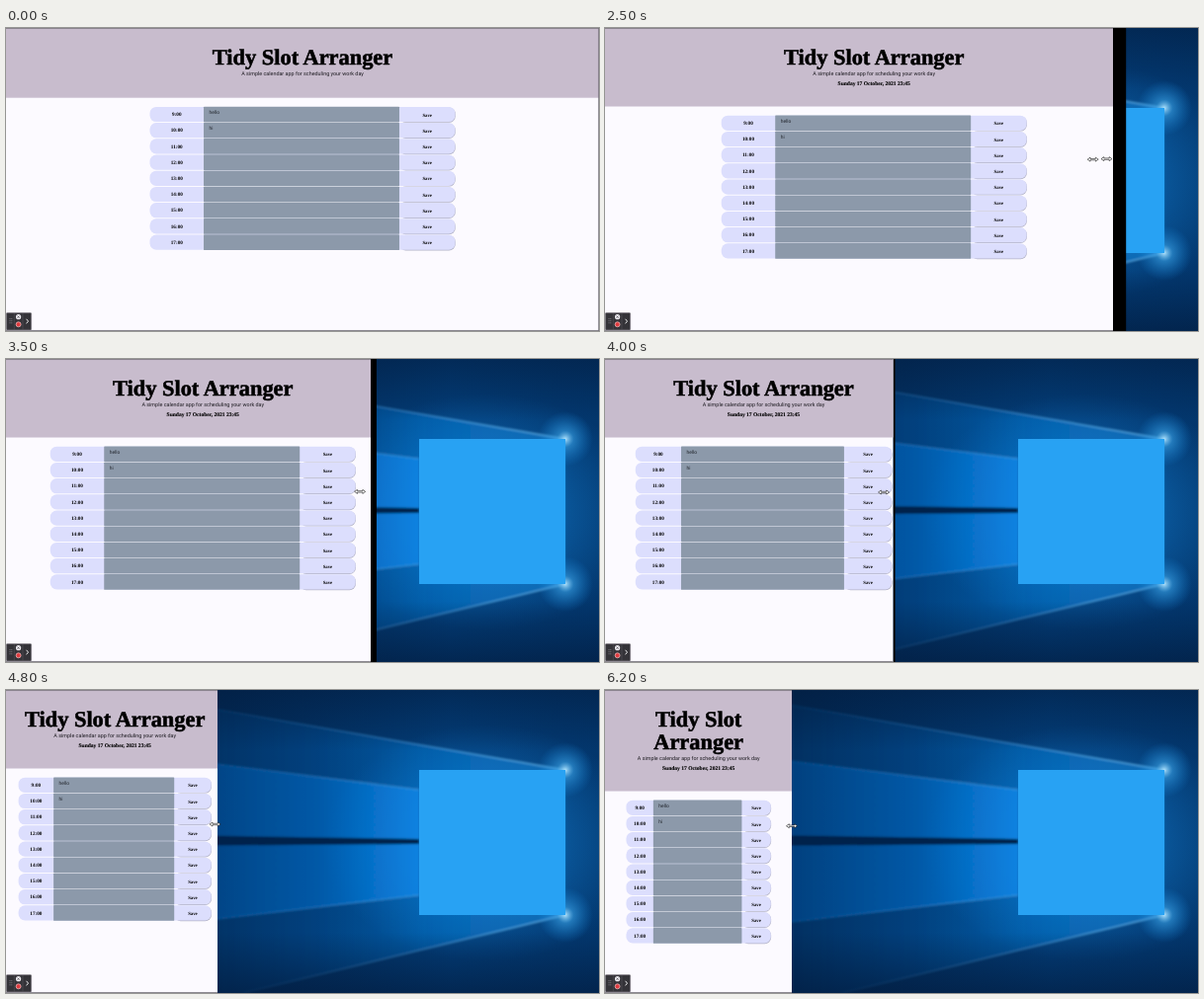
These frames come from a looping animation (600 px wide and 307 px high, 6300 ms). An HTML page:

```html
<!DOCTYPE html>
<html lang="en">
<head>
<meta charset="utf-8">
<title>Day planner resize</title>
<style>
  html, body { margin: 0; width: 100%; height: 100%; overflow: hidden; background: #fcfaff; }
  svg { display: block; width: 100%; height: 100%; }
  text { text-rendering: geometricPrecision; fill: #000; }
  .fat { font-family: "Liberation Serif", serif; font-weight: 700; text-anchor: middle; }
  .title { font-size: 22.4px; stroke: #000; stroke-width: .55; }
  .date { font-size: 5.56px; stroke: #000; stroke-width: .12; }
  .hour { font-size: 5.2px; }
  .save { font-size: 4.8px; }
  .lead { font: 5.42px Roboto, sans-serif; text-anchor: middle; fill: #1c1a20; }
  .note { font: 4.9px Roboto, sans-serif; fill: #20242b; }
</style>
</head>
<body>
<svg viewBox="0 0 600 307" preserveAspectRatio="none">
  <defs>
    <linearGradient id="night" x1="0" x2="1" y1="0" y2="0">
      <stop offset=".3" stop-color="#02264f"/>
      <stop offset=".75" stop-color="#033d78"/>
      <stop offset="1" stop-color="#03366c"/>
    </linearGradient>
    <linearGradient id="ray" gradientUnits="userSpaceOnUse" x1="180" x2="566" y1="0" y2="0">
      <stop offset="0" stop-color="#0764bd" stop-opacity=".3"/>
      <stop offset=".35" stop-color="#0770cf" stop-opacity=".5"/>
      <stop offset=".62" stop-color="#0a88ea" stop-opacity=".8"/>
      <stop offset="1" stop-color="#1c9bf2" stop-opacity=".9"/>
    </linearGradient>
    <linearGradient id="beam" gradientUnits="userSpaceOnUse" x1="180" x2="566" y1="0" y2="0">
      <stop offset="0" stop-color="#1a7ed0" stop-opacity=".25"/>
      <stop offset="1" stop-color="#7fd0ff" stop-opacity=".9"/>
    </linearGradient>
    <radialGradient id="glow">
      <stop offset="0" stop-color="#1690ea" stop-opacity=".65"/>
      <stop offset="1" stop-color="#1690ea" stop-opacity="0"/>
    </radialGradient>
    <radialGradient id="flare">
      <stop offset="0" stop-color="#b5e6ff" stop-opacity=".95"/>
      <stop offset=".3" stop-color="#3fb0f7" stop-opacity=".5"/>
      <stop offset="1" stop-color="#1690ea" stop-opacity="0"/>
    </radialGradient>
    <linearGradient id="shade" x1="0" x2="0" y1="0" y2="1">
      <stop offset="0" stop-color="#021b3d" stop-opacity=".55"/>
      <stop offset=".2" stop-color="#021b3d" stop-opacity="0"/>
      <stop offset=".8" stop-color="#021b3d" stop-opacity="0"/>
      <stop offset="1" stop-color="#021b3d" stop-opacity=".65"/>
    </linearGradient>
    <filter id="soft"><feGaussianBlur stdDeviation=".8"/></filter>
    <clipPath id="clip"><rect id="clipBox" width="600" height="307"/></clipPath>
    <path id="resize" d="M-5.5 0l2.8-2v1.3h5.4v-1.3l2.8 2-2.8 2v-1.3h-5.4v1.3z"/>
  </defs>

  <rect width="600" height="307" fill="url(#night)"/>
  <ellipse cx="485" cy="155" rx="165" ry="120" fill="url(#glow)"/>
  <g filter="url(#soft)">
    <path d="M180 14L566 81V228L240 307H180Z" fill="url(#ray)" opacity=".5"/>
    <path d="M180 71L418 101V208L180 236Z" fill="url(#ray)"/>
    <path d="M180 147L418 151V156L180 158Z" fill="#02234b"/>
    <path d="M180 14L566 81M180 71L418 101M180 236L418 208M240 307L566 228" fill="none" stroke="url(#beam)" stroke-width="1.2"/>
  </g>
  <rect width="600" height="307" fill="url(#shade)"/>
  <circle cx="566" cy="81" r="28" fill="url(#flare)"/>
  <circle cx="566" cy="228" r="28" fill="url(#flare)"/>
  <rect x="418" y="81" width="148" height="147" fill="#28a2f3"/>

  <rect id="gap" height="307" fill="#000"/>

  <g clip-path="url(#clip)">
    <rect width="600" height="307" fill="#fcfaff"/>
    <rect id="header" width="600" fill="#c8bccd"/>
    <g id="head">
      <text class="fat title" id="line1" y="37"></text>
      <text class="fat title" id="line2" y="60"></text>
      <g id="below">
        <text class="lead" y="47.5">A simple calendar app for scheduling your work day</text>
        <text class="fat date" id="date" y="57.8">Sunday 17 October, 2021 23:45</text>
      </g>
    </g>
    <g id="rows"></g>
    <path d="M0 .4H600M0 306.5H600M599.6 0V307" stroke="#736f78" stroke-width=".8"/>
  </g>

  <g id="recorder">
    <rect x=".3" y="288.6" width="25.4" height="17.4" rx="1" fill="#343338" stroke="#8d8992" stroke-width=".6"/>
    <path d="M8.3 289V306M17 289V306" stroke="#5b5860" stroke-width=".5"/>
    <path d="M4 294.2v5.6M5.8 294.2v5.6" stroke="#a7a4ab" stroke-width=".7" stroke-dasharray=".9 1.2"/>
    <circle cx="12.6" cy="292.7" r="2.6" fill="#eceaf0"/>
    <path d="M11.5 291.6l2.2 2.2m0-2.2l-2.2 2.2" stroke="#343338" stroke-width=".6"/>
    <circle cx="12.6" cy="300.3" r="2.5" fill="#e03a3e" stroke="#f3c9ca" stroke-width=".7"/>
    <path d="M20.6 294.8l1.9 2.3-1.9 2.3" fill="none" stroke="#fff" stroke-width=".9"/>
  </g>

  <g fill="#fff" stroke="#111" stroke-width=".6" stroke-linejoin="round">
    <path id="arrow" d="M0 0V5.6L1.4 4.4 2.4 6.5 3.3 6.1 2.4 4.1H4.1Z"/>
    <use id="ghost" href="#resize"/>
    <use id="sizer" href="#resize"/>
  </g>
</svg>

<script>
const LOOP = 6300, STEP = 100, DATE_AT = 300, ARRIVE = 1200;
const LAG = 190, LEAD = 70; // page reflows after the edge, mouse runs ahead of it
const PX = .271, ROW = 16.2, WRAP = 23;
const TITLE = ["Tidy Slot", "Arranger"];

// window edge while it is dragged: [time, x]
const drag = [[1800, 600], [1900, 594], [2000, 594], [2500, 514], [2600, 485], [3050, 485],
  [3200, 464], [3300, 400], [4000, 291.5], [4500, 224], [4800, 214], [5500, 190], [6200, 189]];

const $ = id => document.getElementById(id);
const set = (el, attrs) => { for (const k in attrs) el.setAttribute(k, attrs[k]); };
const move = (el, x, y = 0) => set(el, { transform: `translate(${x} ${y})` });
const show = (el, on) => set(el, { visibility: on ? "visible" : "hidden" });

function make(tag, attrs, parent, text = "") {
  const el = document.createElementNS("http://www.w3.org/2000/svg", tag);
  set(el, attrs);
  el.textContent = text;
  return parent.appendChild(el);
}

function edgeAt(t) {
  const i = drag.findIndex(p => p[0] > t);
  if (i === 0) return drag[0][1];
  if (i < 0) return drag[drag.length - 1][1];
  const [t0, a] = drag[i - 1], [t1, b] = drag[i];
  return a + (b - a) * (t - t0) / (t1 - t0);
}

function mouseAt(t) {
  const u = Math.min(1, Math.max(0, (t - 100) / (ARRIVE - 100)));
  const ease = 1 - (1 - u) ** 2;
  return [
    Math.min(290 + 308 * ease, edgeAt(t + LEAD)),
    42 + 89.5 * ease + Math.max(0, t - ARRIVE) / 800
  ];
}

function containerWidth(view) {
  const css = view / PX;
  return PX * (css >= 1200 ? 1140 : css >= 992 ? 957 : css >= 768 ? 720 : 540);
}

const rows = Array.from({ length: 9 }, (_, i) => {
  const g = make("g", { transform: `translate(0 ${i * ROW})` }, $("rows"));
  const pill = (y, fill) => make("rect", { y, height: 15.2, rx: 6.5, fill }, g);
  return {
    shade: pill(.7, "#b4b4c8"),
    pill: pill(0, "#dcdefd"),
    area: make("rect", { y: -.2, height: 15.7, rx: .6, fill: "#8c99aa" }, g),
    hour: make("text", { y: 9.3, class: "fat hour" }, g, `${9 + i}:00`),
    note: make("text", { y: 6.9, class: "note" }, g, ["hello", "hi"][i]),
    save: make("text", { y: 9.7, class: "fat save" }, g, "Save")
  };
});

function layout(view, dated) {
  const wrap = view < 206;
  const extra = wrap ? WRAP : 0;
  const height = (dated ? 79.5 : 70.7) + extra;
  set($("header"), { height });
  move($("head"), view / 2);
  move($("below"), 0, extra);
  show($("date"), dated);
  $("line1").textContent = wrap ? TITLE[0] : TITLE.join(" ");
  $("line2").textContent = wrap ? TITLE[1] : "";

  const width = containerWidth(view);
  const left = width / 6 + 3, right = width / 6 + 5;
  move($("rows"), (view - width) / 2, height + 9.2);
  for (const r of rows) {
    set(r.shade, { x: width - right, width: right + .3 });
    set(r.pill, { width });
    set(r.area, { x: left, width: width - left - right });
    set(r.hour, { x: left / 2 });
    set(r.note, { x: left + 5.5 });
    set(r.save, { x: width - right / 2 });
  }
}

function draw(t) {
  const edge = edgeAt(t), [x, y] = mouseAt(t);
  layout(edgeAt(t - LAG), t >= DATE_AT);
  set($("clipBox"), { width: edge });
  set($("gap"), { x: edge, width: Math.max(0, (edge - 250) * .05) });
  move($("arrow"), x, y);
  move($("sizer"), x, y);
  move($("ghost"), edge - 6.5, y - .5);
  show($("arrow"), t >= 100 && t < ARRIVE);
  show($("sizer"), t >= ARRIVE);
  show($("ghost"), t >= 2100 && t <= 3400);
}

let start, last;
function tick(now) {
  start ??= now;
  const t = Math.floor((now - start) % LOOP / STEP) * STEP;
  if (t !== last) draw(last = t);
  requestAnimationFrame(tick);
}
draw(0);
requestAnimationFrame(tick);
</script>
</body>
</html>
```
